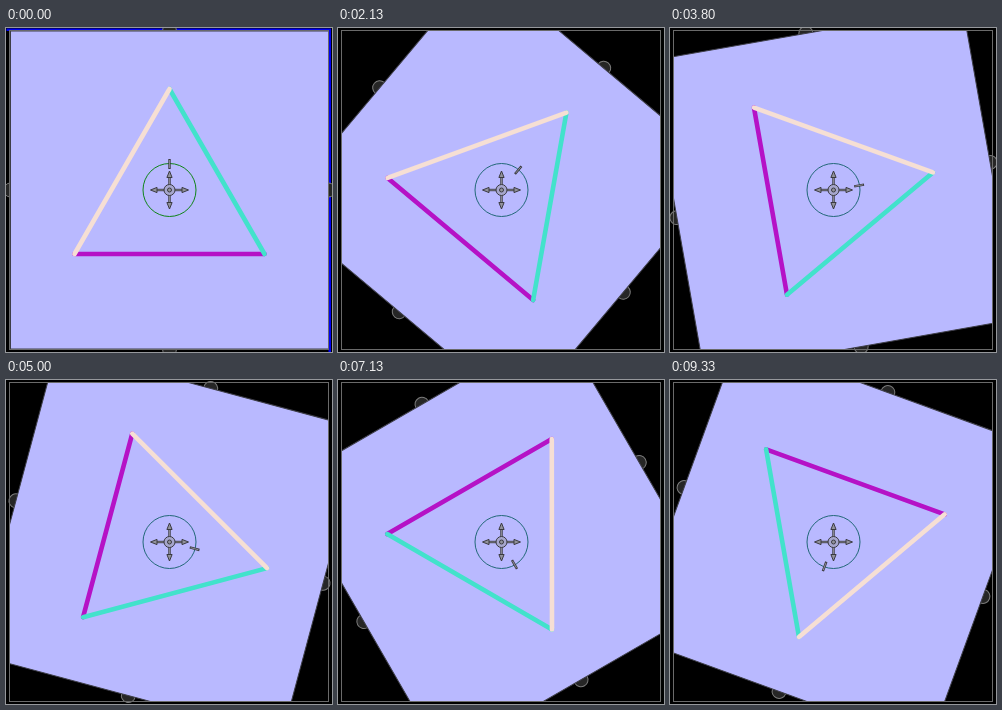
Animation, 326 px wide and 324 px high, one loop 9.47 s. Source, as an HTML page:

```html
<!DOCTYPE html>
<html lang="en">
<head>
<meta charset="utf-8">
<title>Rotating normal map</title>
<style>
  html, body { margin: 0; width: 100%; height: 100%; overflow: hidden; background: #000; }
  svg { display: block; }
  .edge { fill: #b9b9ff; stroke: #3e3e48; }
  .knob { fill: #262626; stroke: #7c7c7c; }
  .frame { fill: none; stroke: #6a6a6a; }
  .side { stroke-width: 4.6; stroke-linecap: round; }
  .dark { stroke: #3a3a40; }
  .shaft { stroke-width: 2.4; }
  .core { stroke: #8e8e98; stroke-width: .9; }
  .head { fill: #92929c; stroke: #3a3a40; stroke-linejoin: round; }
</style>
</head>
<body>
<svg width="326" height="324" viewBox="0 0 326 324">
  <defs>
    <clipPath id="view"><rect x="3" y="2" width="320" height="320"/></clipPath>
    <g id="arrow">
      <line class="dark shaft" y1="-5" y2="-14"/>
      <line class="core" y1="-5" y2="-14"/>
      <path class="head" d="M0-19L2.6-12.5H-2.6Z"/>
    </g>
  </defs>
  <rect width="326" height="324"/>
  <g class="spin">
    <path id="bands" fill="#0000f0" d="M-163-161.5H161.5V163H159V-159H-163Z"/>
    <g id="knobs"></g>
  </g>
  <g clip-path="url(#view)">
    <g class="spin">
      <rect class="edge" x="-159" y="-159" width="318" height="318"/>
      <line class="side" stroke="#b512c6" x1="-95" y1="64" x2="95" y2="64"/>
      <line class="side" stroke="#42e2cb" x1="95" y1="64" x2="0" y2="-101"/>
      <line class="side" stroke="#f6dfd4" x1="0" y1="-101" x2="-95" y2="64"/>
    </g>
  </g>
  <rect class="frame" x="3.5" y="2.5" width="319" height="319"/>
  <g transform="translate(163.5 162)">
    <circle id="ring" r="26.5" fill="none"/>
    <g id="arrows"></g>
    <circle r="5.5" fill="#a6a6cc" class="dark"/>
    <circle r="2" fill="#92929c" class="dark"/>
  </g>
  <g class="spin">
    <line class="dark shaft" y1="-21" y2="-31"/>
    <line class="core" y1="-22" y2="-30"/>
  </g>
</svg>
<script>
  const $ = id => document.getElementById(id);
  const quarters = [0, 90, 180, 270];
  $('knobs').innerHTML = quarters.map(a =>
    `<circle class="knob" cy="-159" r="7" transform="rotate(${a})"/>`).join('');
  $('arrows').innerHTML = quarters.map(a =>
    `<use href="#arrow" transform="rotate(${a})"/>`).join('');

  // Pace of the turn: [step of 5 degrees, tick at 15 per second]
  const pace = [[0, 0], [1, 9.8], [17, 60.6], [31, 111.1], [40, 140.98]];
  const LOOP = 9470;

  function startOf(step) {
    const i = Math.max(1, pace.findIndex(p => p[0] >= step));
    const [s0, k0] = pace[i - 1], [s1, k1] = pace[i];
    const ticks = Math.floor(k0 + (k1 - k0) * (step - s0) / (s1 - s0));
    return Math.round(ticks * 100 / 15) * 10;
  }

  const starts = Array.from({ length: 41 }, (_, step) => startOf(step));
  const spinners = document.querySelectorAll('.spin');

  function show(step) {
    const angle = step * 5;
    for (const s of spinners) s.setAttribute('transform', `translate(163.5 162) rotate(${angle})`);
    $('bands').style.display = angle % 90 ? 'none' : '';
    $('ring').setAttribute('stroke', step ? '#226878' : '#0f8418');
  }

  const t0 = performance.now();
  function tick() {
    const t = (performance.now() - t0) % LOOP;
    show(starts.findLastIndex(s => s <= t));
    requestAnimationFrame(tick);
  }
  show(0);
  requestAnimationFrame(tick);
</script>
</body>
</html>
```
